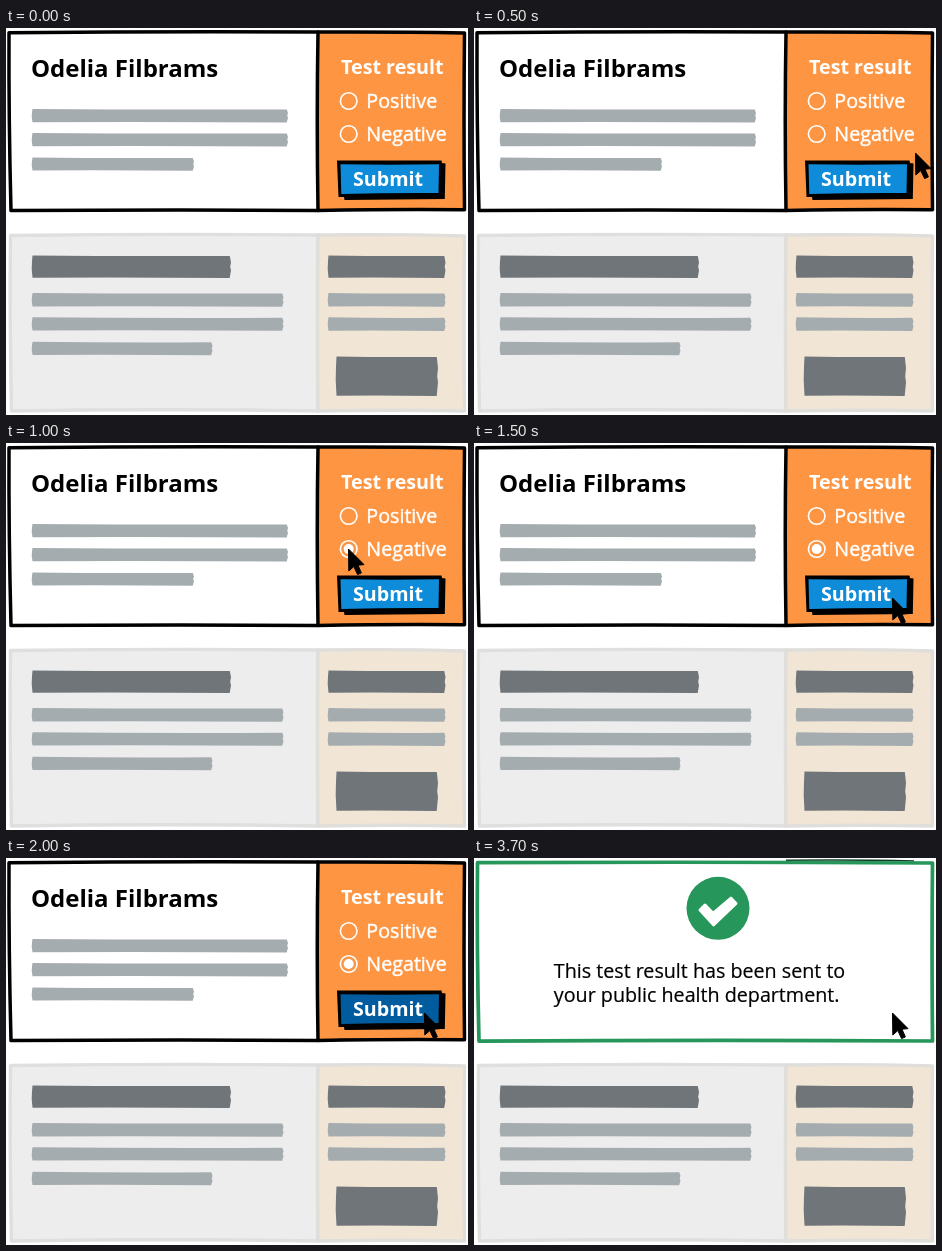
An HTML page for the animation above (4.5 s loop, 462x387 px).

```html
<!DOCTYPE html>
<html lang="en">
<head>
<meta charset="utf-8">
<title>Test result form</title>
<style>
  html, body { margin: 0; width: 100%; height: 100%; overflow: hidden; background: #fff; }
  svg { display: block; width: 462px; height: 387px; }
  text { font-family: "Open Sans", "Noto Sans", sans-serif; font-size: 19.7px; }
  .bold { font-weight: 700; }
  .name { font-size: 24px; }
  .option { stroke: #fff; stroke-width: 0.45px; }
  .message { stroke: #000; stroke-width: 0.2px; }
</style>
</head>
<body>
<svg viewBox="0 0 462 387">
  <g id="form">
    <path d="M4 4.5 L312 4 L312 182 L5 182Z" fill="#fff"/>
    <path d="M312 4 L458 5 Q457 90 458 181.5 L312 182Z" fill="#fe9542"/>
    <g fill="none" stroke="#000" stroke-width="3.5" stroke-linecap="round" stroke-linejoin="round">
      <path d="M312 4 Q160 3.2 3 4.7 Q2.6 90 5 182.6 Q160 181.4 312 182.4"/>
      <path d="M312 4 Q390 3.6 458.5 5 Q457.6 90 458.5 181.8 Q390 181.2 312 182.4 Q310.5 90 312 4"/>
    </g>
    <text class="bold name" x="25" y="48.5">Odelia Filbrams</text>
    <g id="details"></g>
    <g fill="#fff">
      <text class="bold" x="335" y="46.3">Test result</text>
      <text class="option" x="360.3" y="79.7">Positive</text>
      <text class="option" x="360.3" y="112.7">Negative</text>
    </g>
    <g fill="none" stroke="#fff" stroke-width="1.6">
      <circle cx="342.7" cy="73" r="8.3"/>
      <circle cx="342.7" cy="106" r="8.3"/>
    </g>
    <circle id="dot" cx="342.7" cy="106" r="5" fill="#fff"/>
    <path d="M331 132.5 L435.5 132.5 L436 135 L439.5 135.5 L438.8 171 L338.5 172 L338 169 L332.5 169Z"/>
    <path id="button" d="M334.5 136.3 Q385 137 433 136.3 L432.5 165 Q385 164.6 335.3 166Z"/>
    <text class="bold" x="347" y="158.2">Submit</text>
  </g>

  <g id="done">
    <path d="M312 2.2 Q380 1.4 440 3" fill="none" stroke="#123a26" stroke-width="1.5"/>
    <path d="M3.5 4.7 Q230 3.7 458.5 5 Q457.6 90 458.5 183 Q230 181.8 5 183.2 Q2.6 90 3.5 4.7Z"
      fill="#fff" stroke="#26965a" stroke-width="3.7" stroke-linejoin="round"/>
    <circle cx="244" cy="50.3" r="31.5" fill="#26965a"/>
    <path d="M226 52 L231 47 L239 55.3 L257 40.2 L262 45.5 L239.5 66.8Z"
      fill="#fff" stroke="#fff" stroke-width="3" stroke-linejoin="round"/>
    <text class="message" x="79.8" y="120.3">This test result has been sent to</text>
    <text class="message" x="79.8" y="143.8">your public health department.</text>
  </g>

  <g stroke-linejoin="round" stroke-width="3.4">
    <path d="M312 207 Q160 205.5 4.5 207.5 Q3.5 290 5.5 383 Q160 380.5 312 383Z" fill="#ededed" stroke="#dfdfdf"/>
    <path d="M312 207 Q390 206 458.5 208 Q457.5 290 458.5 383 Q390 381.5 312 383 Q310.8 290 312 207Z" fill="#f1e5d6" stroke="#e0dedb"/>
  </g>
  <g id="next"></g>
  <path id="cursor" stroke="#000" stroke-linejoin="round"
    d="M0.5 1 L0.8 23 L5.8 18.6 L9.6 26.6 L13.4 24.9 L10 17.2 L16 16.6Z"/>
</svg>

<script>
const $ = id => document.getElementById(id);
const LIGHT = "#a5acaf", DARK = "#6f7579";

// A marker stroke: slightly bowed edges and a ragged right end
function bar(x, y, right, bottom, fill) {
  const mid = (x + right) / 2, h = bottom - y;
  return `<path fill="${fill}" d="M${x + 0.5} ${y} Q${mid} ${y + 0.9} ${right - 1.2} ${y + 0.4}
    L${right} ${y + h * 0.3} L${right - 0.8} ${y + h * 0.5} L${right} ${y + h * 0.65}
    L${right - 1.3} ${bottom} Q${mid} ${bottom - 0.8} ${x + 0.5} ${bottom - 0.3}
    L${x - 0.3} ${y + h * 0.6} L${x} ${y + h * 0.25}Z"/>`;
}

$("details").innerHTML =
  bar(26, 81, 282, 94.5, LIGHT) +
  bar(26, 105, 282, 118.5, LIGHT) +
  bar(26, 129.5, 188, 142.8, LIGHT);

$("next").innerHTML =
  bar(26, 227.5, 225, 250, DARK) +
  bar(26, 265, 277.5, 278.8, LIGHT) +
  bar(26, 289.3, 277.5, 302.8, LIGHT) +
  bar(26, 313.8, 206.5, 327.3, LIGHT) +
  bar(322, 227.5, 439.5, 250, DARK) +
  bar(322, 265, 439.5, 278.8, LIGHT) +
  bar(322, 289.3, 439.5, 303, LIGHT) +
  bar(330, 328.5, 432, 368, DARK);

// The submit label stays white on either button colour
$("button").nextElementSibling.setAttribute("fill", "#fff");

const LOOP = 4500;
const stops = [null, [441, 124], [342, 105], [418, 154]];

const show = (id, on) => $(id).setAttribute("visibility", on ? "visible" : "hidden");

function render(time) {
  const t = time % LOOP;
  const step = Math.min(5, Math.floor(t / 500));
  const spot = stops[Math.min(step, 3)];

  show("form", step < 5);
  show("done", step === 5);
  show("dot", step >= 2 && step < 5);
  show("cursor", spot !== null);
  if (spot) $("cursor").setAttribute("transform", `translate(${spot})`);
  $("button").setAttribute("fill", step === 4 ? "#005b9f" : "#0f8cd9");
}

const start = performance.now();
function tick() {
  render(performance.now() - start);
  requestAnimationFrame(tick);
}
tick();
</script>
</body>
</html>
```
